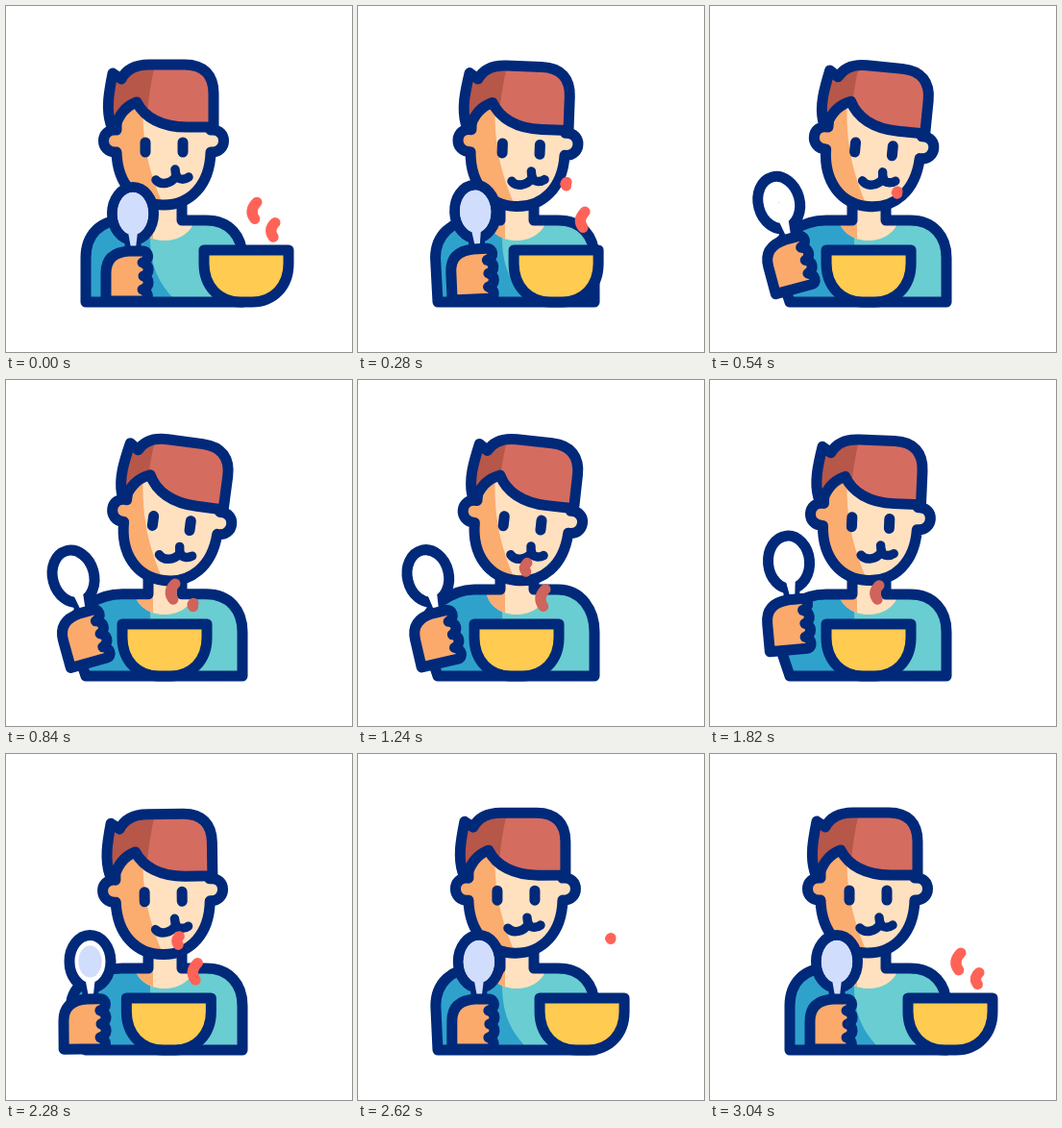
Recreate the animation shown at these times as an HTML page. Size 360 px wide and 360 px high, loop 3100 ms.

```html
<!DOCTYPE html>
<html lang="en">
<head>
<meta charset="utf-8">
<title>Soup time</title>
<style>
  html, body { margin: 0; width: 100%; height: 100%; overflow: hidden; background: #fff; }
  svg { display: block; width: 100vw; height: 100vh; }
  .ink { stroke: #00297a; stroke-width: 11; stroke-linecap: round; stroke-linejoin: round; }
  .line { fill: none; }
  .fine { stroke-width: 9.5; }
  .stem { stroke-width: 17; stroke-linecap: butt; }
</style>
</head>
<body>
<svg viewBox="0 0 360 360">
  <defs>
    <path id="torso"/>
    <path id="skull" d="M115 100V129C97 127 97 153 115 152C116 186 136 207 164 207S212 186 213 152C231 153 231 127 213 129V100Z"/>
    <path id="hair" d="M109 123C104 107 107 90 111 70L120 76C125 66 134 61 149 61H186C206 61 216 72 216 91V126H188C162 126 144 116 136 100C123 105 118 114 114 124Z"/>
    <path id="collar" d="M149 200V223H134C141 251 189 251 196 223H181V200Z"/>
    <clipPath id="torsoClip"><use href="#torso"/></clipPath>
    <clipPath id="skullClip"><use href="#skull"/></clipPath>
    <clipPath id="hairClip"><use href="#hair"/></clipPath>
    <clipPath id="collarClip"><use href="#collar"/></clipPath>
  </defs>

  <use href="#torso" fill="#69cdd1"/>
  <path d="M50 205H150V245C151 273 160 291 180 310H50Z" fill="#2fa2cc" clip-path="url(#torsoClip)"/>
  <use href="#collar" fill="#ffe1c0"/>
  <path d="M130 195H153V250H130Z" fill="#f9ad72" clip-path="url(#collarClip)"/>
  <path id="torsoLine" class="ink line"/>

  <g id="head">
    <use href="#skull" fill="#ffe1c0"/>
    <g clip-path="url(#skullClip)">
      <path class="shade" d="M90 90H143C141 130 144 165 166 212H90Z" fill="#fbac6f"/>
    </g>
    <use href="#skull" class="ink line"/>
    <use href="#hair" fill="#d56c60"/>
    <g clip-path="url(#hairClip)">
      <path class="shade" d="M90 50H158Q149 80 145 130H90Z" fill="#b65749"/>
    </g>
    <use href="#hair" class="ink line"/>
    <g id="features" class="ink line">
      <path d="M145 142V152M184 142V152"/>
      <path class="fine" d="M156 181C161 187 172 185 177 177C180 181 186 181 190 178M176 170Q176 174 178 178"/>
    </g>
  </g>

  <g id="arm">
    <path class="ink stem" d="M132 240V256"/>
    <ellipse class="ink" cx="132" cy="216" rx="21.5" ry="27.5" fill="#fff"/>
    <path id="handle" d="M127 235H137L135 252H130Z"/>
    <ellipse id="food" cx="132" cy="216" rx="16.2" ry="22.2" fill="#d1ddfd"/>
    <path class="ink" fill="#fbaa6c" d="M104 307V278C104 262 114 256 128 255H142C149 255 150 265 142 267C150 269 150 279 143 281C150 283 150 293 142 295C149 297 149 307 143 307Z"/>
  </g>

  <g id="bowl">
    <path class="ink" fill="#ffcb50" d="M206 254H294V268C294 292 278 308 256 308H244C222 308 206 292 206 268Z"/>
    <g id="steam" fill="none" stroke-width="11" stroke-linecap="round">
      <path/><path/>
    </g>
  </g>
</svg>
<script>
const LOOP = 3100;
const $ = id => document.getElementById(id);
const set = (node, name, value) => node.setAttribute(name, value);

// Smooth 0 to 1 ramp, and a smooth peak built from it
const rise = (t, start, span) => {
  const u = Math.min(1, Math.max(0, (t - start) / span));
  return u * u * (3 - 2 * u);
};
const bump = (t, peak, width) => 1 - rise(Math.abs(t - peak), 0, width);

function drawTorso(armX, shrug) {
  const left = 83 + armX * 0.35, y = 223 - shrug;
  const leftSide = `M148 204V${y}H121C98 ${y} ${left} 238 ${left} 262L83 308`;
  const rightSide = `H246V262C246 240 233 ${y} 208 ${y}H183`;
  set($("torsoLine"), "d", leftSide + rightSide + "V204");
  set($("torso"), "d", leftSide.replace("V" + y, "M148 " + y) + rightSide + "Z");
}

function drawHead(t) {
  const tilt = 7.5 * (rise(t, 0, 800) - rise(t, 840, 1600)) - bump(t, 2280, 400);
  const nod = 1.5 * (rise(t, 0, 300) - rise(t, 2300, 400));
  set($("head"), "transform", `translate(0 ${nod}) rotate(${tilt} 164 207)`);
  set($("features"), "transform", `translate(${3 * bump(t, 280, 280)} 0)`);
  // Shadow edges stay upright while the head tilts
  document.querySelectorAll(".shade").forEach(s => set(s, "transform", `rotate(${-tilt} 164 207)`));
}

function drawArm(t) {
  const reach = rise(t, 180, 400);
  const x = -44 * (reach - rise(t, 2300, 420));
  const y = -12 * (reach - rise(t, 1900, 380)) - 14 * bump(t, 1820, 400);
  const tilt = -15.5 * (reach - rise(t, 840, 1600));
  set($("arm"), "transform", `translate(${x} ${y}) rotate(${tilt} 124 282)`);

  const full = 1 - rise(t, 400, 160) + rise(t, 2160, 180);
  set($("food"), "transform", `translate(132 216) scale(${full}) translate(-132 -216)`);
  set($("handle"), "fill", full > 0.9 ? "#d1ddfd" : "#fff");
  return x;
}

// Each puff appears, grows, drifts up ever faster and shrinks away
function puff(t, i) {
  const period = LOOP / 3, life = 800;
  const age = (t - 560 - 240 * i + LOOP) % period;
  if (age > life) return "";
  const u = age / life;
  const size = 72 * u * (1 - u);
  const top = 222 + 12 * i - 44 * u ** 3 - size / 2;
  return `M${261 + 19 * i} ${top}q${-size / 2} ${size / 2} ${-size / 8} ${size}`;
}

function drawBowl(t) {
  const x = -85 * (rise(t, 0, 550) - rise(t, 2200, 590));
  set($("bowl"), "transform", `translate(${x} 0)`);
  set($("steam"), "stroke", t > 550 && t < 2180 ? "#d0635a" : "#ff6358");
  [...$("steam").children].forEach((path, i) => set(path, "d", puff(t, i)));
}

function draw(t) {
  drawTorso(drawArm(t), 5 * bump(t, 1240, 450));
  drawHead(t);
  drawBowl(t);
}

const start = performance.now();
function tick() {
  draw((performance.now() - start) % LOOP);
  requestAnimationFrame(tick);
}
draw(0);
requestAnimationFrame(tick);
</script>
</body>
</html>
```
